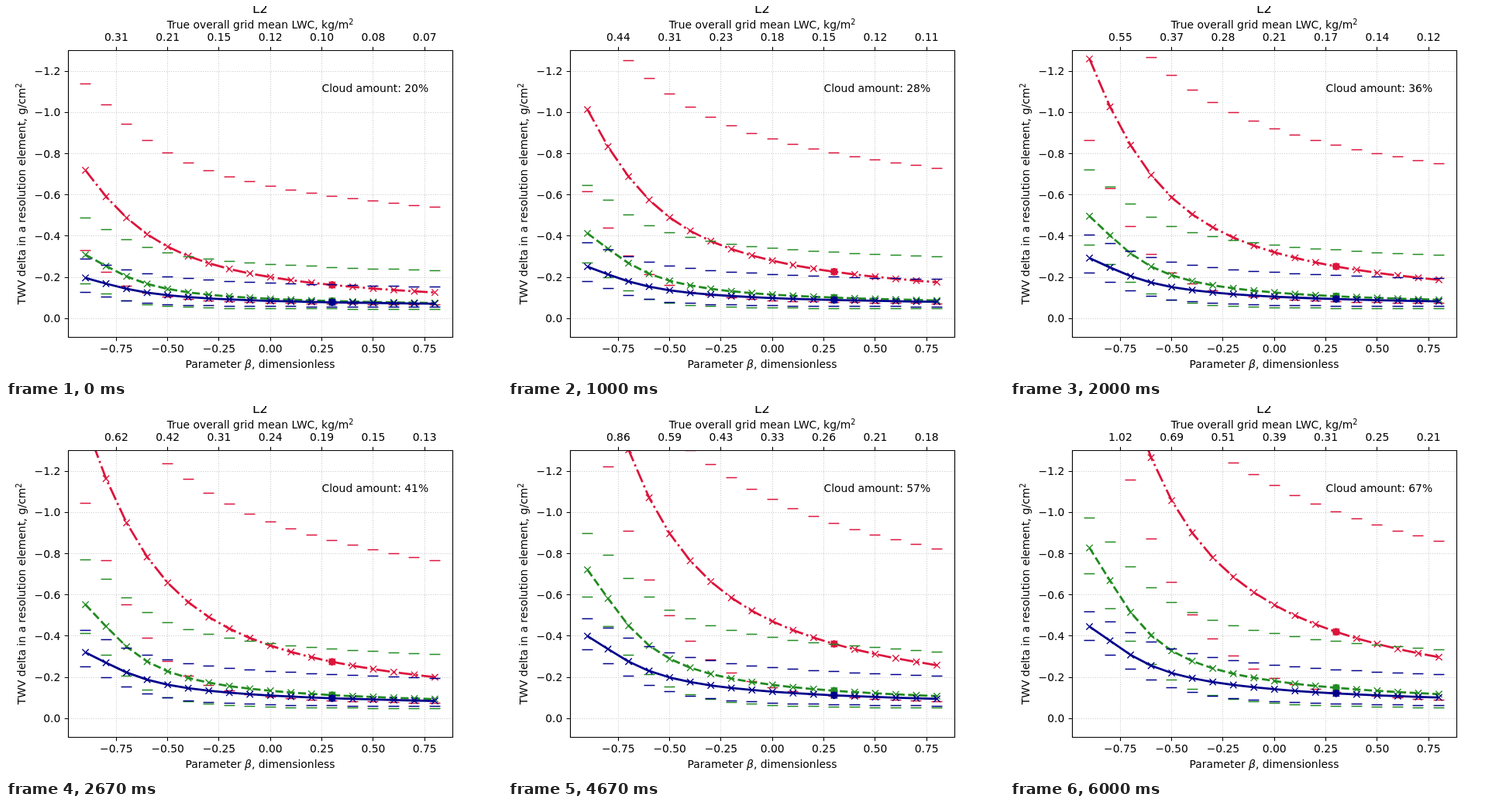
An HTML page that plays this animation: 640 px wide and 480 px high, repeating every 6330 ms.

```html
<!DOCTYPE html>
<html lang="en">
<head>
<meta charset="utf-8">
<title>L2</title>
<style>
html, body { margin: 0; width: 100%; height: 100%; overflow: hidden; background: #fff; }
svg { display: block; width: 640px; height: 480px; font: 13.89px "DejaVu Sans", sans-serif; }
</style>
</head>
<body>
<svg id="chart" viewBox="0 0 640 480">
  <defs><clipPath id="plot"><rect x="80" y="57.6" width="496" height="369.6"/></clipPath></defs>
</svg>
<script>
const LOOP = 6330, STEPS = 19;
const BETAS = Array.from({ length: 18 }, (_, i) => (i - 9) / 10);
const TICKS = Array.from({ length: 7 }, (_, i) => (i - 3) / 4);

// mean: base + (slope + gain * peak) * water - bend * water^2, peak of the given width
// low:  floor + a soft ramp that starts at knee
// high: mean + spread, which shrinks once the mean nears limit
const SERIES = [
  { color: "#dc143c", dash: "17.78 4.44 2.78 4.44", base: 0.05, slope: 1.185, gain: 0.44, width: 0.42,
    bend: -0.05, floor: 0.028, knee: 0.48, spread: 0.605, limit: 1.2 },
  { color: "#228b22", dash: "10.28 4.44", base: 0.055, slope: 0.315, gain: 0.335, width: 0.3,
    bend: 0.06, floor: 0.027, knee: 0.19, spread: 0.23, limit: 0.9 },
  { color: "#00008b", dash: "none", base: 0.058, slope: 0.225, gain: 0.142, width: 0.3,
    bend: 0.06, floor: 0.04, knee: 0.125, spread: 0.118, limit: 0.48 }
];

const cloudAt = step => 20 + step * 50 / 19;

// Mean water content: proportional to cloud amount, with an early surplus.
function water(b, step) {
  const surplus = 0.02 * Math.exp(-(((step - 3.3) / 2.4) ** 2));
  return cloudAt(step) / 100 / (1.727 + 1.697 * b + 0.365 * b * b) + surplus;
}

function meanAt(s, b, step) {
  const w = water(b, step);
  const peak = 1 / (1 + ((b + 0.9) / s.width) ** 2);
  return s.base + (s.slope + s.gain * peak) * w - s.bend * w * w;
}

function lowAt(s, mean) {
  const over = mean - s.knee;
  return s.floor + 0.525 * (over + Math.hypot(over, s.knee / 2));
}

function highAt(s, mean, b, step) {
  const growth = 1 - 0.27 * Math.exp(-step / 1.2);
  return mean + s.spread * growth * (1 - 0.08 * b) / (1 + (mean / s.limit) ** 4);
}

const svg = document.getElementById("chart");
const xOf = b => 80 + (b + 0.985) * 496 / 1.87;
const yOf = v => 57.6 + (1.3 - v) * 369.6 / 1.39;
const snap = n => Math.floor(n) + 0.5;

function add(parent, tag, attrs, text) {
  const el = document.createElementNS("http://www.w3.org/2000/svg", tag);
  for (const name in attrs) el.setAttribute(name, attrs[name]);
  if (text) el.textContent = text;
  parent.appendChild(el);
  return el;
}

const label = (x, y, text, anchor = "middle", more = {}) =>
  add(svg, "text", { x, y, "text-anchor": anchor, ...more }, text);

const squared = el => add(el, "tspan", { dy: -5.3, "font-size": 9.72 }, "2");

// Grid
let gridPath = "";
for (const b of TICKS) gridPath += `M${snap(xOf(b))} 427.5V57.5`;
for (let n = 0; n <= 6; n++) gridPath += `M80.5 ${snap(yOf(n / 5))}H576.5`;
add(svg, "path", { d: gridPath, stroke: "#cacaca", "stroke-width": 1.11, "stroke-dasharray": "1.11 1.83" });

// Curves
const plot = add(svg, "g", { "clip-path": "url(#plot)", fill: "none" });
const curves = SERIES.map(series => {
  const g = add(plot, "g", { stroke: series.color, "stroke-width": 1.39 });
  return {
    series,
    bars: add(g, "path", {}),
    line: add(g, "path", { "stroke-width": 2.78, "stroke-dasharray": series.dash, "stroke-linejoin": "round" }),
    marks: add(g, "path", {}),
    dot: add(g, "circle", { cx: xOf(0.3), r: 4.17, fill: series.color })
  };
});

// Frame, ticks and labels
let frame = "M80.5 57.5H576.5V427.5H80.5Z";
const topLabels = TICKS.map(b => {
  const x = xOf(b);
  frame += `M${snap(x)} 427.5v4.86M${snap(x)} 57.5v-4.86`;
  label(x, 447, (b < 0 ? "−" : "") + Math.abs(b).toFixed(2));
  return label(x, 45, "");
});
for (let n = 0; n <= 6; n++) {
  const y = yOf(n / 5);
  frame += `M80.5 ${snap(y)}h-4.86`;
  label(70.3, Math.round(y + 5), (n ? "−" : "") + (n / 5).toFixed(1), "end");
}
add(svg, "path", { d: frame, fill: "none", stroke: "#000", "stroke-width": 1.11 });

label(328, 9, "L2", "middle", { "font-size": 16.67 });
squared(label(328, 29, "True overall grid mean LWC, kg/m"));
squared(label(0, 0, "TWV delta in a resolution element, g/cm", "middle",
  { transform: "translate(25 242.4) rotate(-90)" }));
const param = label(328, 467, "Parameter ");
add(param, "tspan", { "font-style": "italic" }, "β");
add(param, "tspan", {}, ", dimensionless");
const cloud = label(xOf(0.25), 111, "", "start");

const bar = (x, y) => `M${snap(x) - 6.94} ${snap(y)}h13.89`;
const cross = (x, y) => `M${x - 4.17} ${y - 4.17}l8.34 8.34m0 -8.34l-8.34 8.34`;

// Dashes count from where the line enters the stage.
function linePath(points) {
  const first = points.findIndex(p => p[1] >= -1);
  const seen = points.slice(first);
  if (first > 0) {
    const [[x0, y0], [x1, y1]] = points.slice(first - 1, first + 1);
    seen.unshift([x0 + (x1 - x0) * (-1 - y0) / (y1 - y0), -1]);
  }
  return "M" + seen.map(p => p.join(" ")).join("L");
}

function draw(step) {
  for (const { series, bars, line, marks, dot } of curves) {
    let barPath = "", markPath = "";
    const points = BETAS.map(b => {
      const mean = meanAt(series, b, step);
      const x = xOf(b), y = yOf(mean);
      barPath += bar(x, yOf(highAt(series, mean, b, step))) + bar(x, yOf(lowAt(series, mean)));
      markPath += cross(x, y);
      return [x, y];
    });
    line.setAttribute("d", linePath(points));
    marks.setAttribute("d", markPath);
    bars.setAttribute("d", barPath);
    dot.setAttribute("cy", yOf(meanAt(series, 0.3, step)));
  }
  TICKS.forEach((b, i) => { topLabels[i].textContent = water(b, step).toFixed(2); });
  cloud.textContent = `Cloud amount: ${Math.round(cloudAt(step))}%`;
}

// Steps last a third of a second, rounded to 10 ms.
function stepAt(t) {
  let k = 0;
  while (k < STEPS - 1 && Math.round((k + 1) * 100 / 3) * 10 <= t) k++;
  return k;
}

let shown = -1;
const start = performance.now();
function tick() {
  const step = stepAt((performance.now() - start) % LOOP);
  if (step !== shown) draw(shown = step);
  requestAnimationFrame(tick);
}
tick();
</script>
</body>
</html>
```
